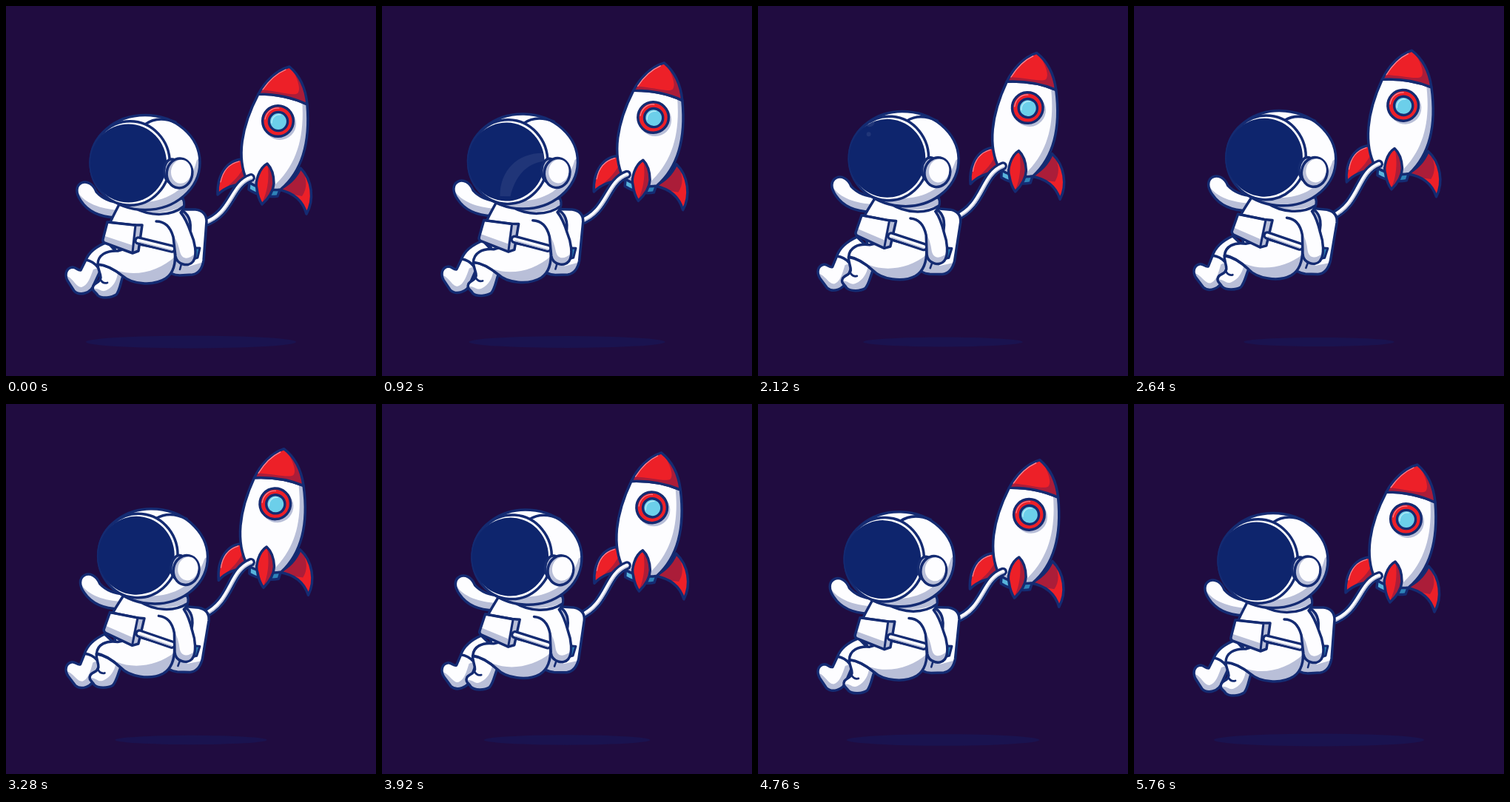
Recreate the animation shown at these times as an HTML page with a canvas. Size 500x500 px, loop 5.8 s.

```html
<!DOCTYPE html>
<html lang="en">
<head>
<meta charset="utf-8">
<title>Astronaut and rocket</title>
<style>
html, body { margin: 0; width: 100%; height: 100%; overflow: hidden; background: #200c40; }
canvas { display: block; width: 100vw; height: 100vh; }
</style>
</head>
<body>
<canvas id="stage" width="500" height="500"></canvas>
<script>
const ctx = document.getElementById('stage').getContext('2d');
const LOOP = 5800;
const BG = '#200c40', LINE = '#142b72', VISOR = '#0e256d', WHITE = '#fdfdff', GREY = '#b9bfd8';
const RED = '#ed2028', DARK_RED = '#ab1d39', PINK = '#f58c98', CYAN = '#6ccfea', BLUE = '#2f83b8';
const PIVOT = [256, 326];

// Filled shape with an optional clipped shade and an outline
function part(d, fill, shade, shadeFill, width = 3.5) {
  const p = new Path2D(d);
  ctx.fillStyle = fill;
  ctx.fill(p);
  if (shade) {
    ctx.save();
    ctx.clip(p);
    ctx.fillStyle = shadeFill || GREY;
    ctx.fill(new Path2D(shade));
    ctx.restore();
  }
  if (width) line(d, LINE, width);
}

function line(d, color = LINE, width = 3.5) {
  ctx.strokeStyle = color;
  ctx.lineWidth = width;
  ctx.stroke(new Path2D(d));
}

function oval(x, y, rx, ry, fill, width = 0, tilt = 0) {
  ctx.beginPath();
  ctx.ellipse(x, y, rx, ry, tilt, 0, 2 * Math.PI);
  ctx.fillStyle = fill;
  ctx.fill();
  if (width) {
    ctx.strokeStyle = LINE;
    ctx.lineWidth = width;
    ctx.stroke();
  }
}

function turn(angle, x, y, shift, draw) {
  ctx.save();
  ctx.translate(x, y + shift);
  ctx.rotate(angle);
  ctx.translate(-x, -y);
  draw();
  ctx.restore();
}

function rocket() {
  part('M329 238L328 248C340 256 355 259 367 257L371 246Z', BLUE,
    'M326 238L338 240L337 258L324 254Z', '#58b4dc');
  part('M321 207C301 207 285 225 286 255C296 245 308 241 328 239Z', RED,
    'M322 216C316 229 308 237 294 248L330 244Z', DARK_RED);
  line('M290 238C293 223 302 213 315 210', PINK, 1.2);
  part('M398 219C414 235 417 262 406 281C401 262 388 252 368 248C382 242 392 232 398 219Z', RED,
    'M398 218C407 232 408 245 400 257L364 250Z', DARK_RED);
  part('M341 119C318 163 311 205 326 237C340 246 356 250 371 248C402 222 411 180 407 133C388 124 365 119 341 119Z', WHITE,
    'M400 126C404 175 394 215 361 244L325 233L322 255L420 260L420 125Z');
  part('M383 82C365 87 350 102 341 119C365 119 388 124 407 133C405 111 396 93 383 82Z', RED,
    'M385 82C394 98 399 112 394 118C388 122 368 115 345 113L338 124L412 140L412 96Z', DARK_RED);
  line('M347 113C356 100 366 91 378 86', PINK, 1.3);
  oval(370, 159, 22, 22, GREY);
  oval(367.5, 155.5, 20.8, 20.8, RED, 3.5);
  line('M350 153C352 143 360 137 369 138', PINK, 1.2);
  oval(368, 156, 12.6, 12.6, CYAN, 3.4);
  line('M359 158C359 151 364 146 371 147', '#b3ebf7', 1.5);
}

function middleFin() {
  part('M353 213C342 219 336 238 339 247C340 256 342 262 346 268C356 259 361 251 362 240C362 228 359 219 353 213Z',
    RED, 'M353 211C356 228 355 249 345 268L366 268L366 215Z', DARK_RED);
}

function tether(k, angle) {
  const dx = 268 - PIVOT[0], dy = 293 - PIVOT[1];
  const c = Math.cos(angle), s = Math.sin(angle);
  const x = PIVOT[0] + dx * c - dy * s - 4 * k, y = PIVOT[1] + dx * s + dy * c - 10 * k;
  const d = `M331 ${232 - 19 * k}C${304 - 3 * k} ${241 - 16 * k} ${305 + k} ${281 - 15 * k} ${x} ${y}`;
  line(d, LINE, 11.8);
  line(d, WHITE, 5.2);
  ctx.save();
  ctx.translate(1, 1.7);
  line(d, GREY, 1.6);
  ctx.restore();
}

function backpack() {
  part('M236 275L256 275Q271 277 271 291L267 344Q264 361 252 363L235 364Q222 364 217 355Z', WHITE,
    'M232 272L240 278C249 286 250 300 247 318L247 352L267 346L268 368L210 368L225 275Z');
  line('M239 277C250 284 251 299 247 315');
  line('M235 356L238 345', LINE, 2.6);
}

function leftArm() {
  part('M156 266C140 265 130 260 122 251C118 240 109 236 102 239C94 243 94 253 101 263C110 277 126 285 148 286Z',
    WHITE, 'M96 250C106 267 128 274 152 276L150 292L110 290L90 262Z');
}

function leftLeg() {
  part('M137 319C121 325 112 333 108 343L101 357C97 358 95 353 90 353C81 354 79 363 83 371L92 385C99 392 115 389 119 376L130 352C132 340 137 335 148 331Z',
    WHITE, 'M80 364C91 367 94 380 102 380C110 378 114 367 118 356L130 352L124 393L86 393Z');
  line('M108 343Q118 345 124 353');
}

function rightLeg() {
  part('M124 349C124 356 128 361 128 367C127 374 121 373 118 378C115 385 121 386 124 391C130 396 143 394 149 390C154 384 155 373 158 365C148 357 137 350 124 349Z',
    WHITE, 'M116 382C127 380 128 388 136 384C146 379 150 369 151 361L162 364L156 398L118 398Z');
  line('M127 369Q131 376 137 374', LINE, 2.8);
}

function torso() {
  part('M153 268C147 280 141 290 139 298L148 332L229 340C237 315 240 295 237 278C241 273 242 266 239 260Z', WHITE,
    'M150 268C182 284 222 282 242 268L240 255L148 255Z');
  line('M174 273C196 285 223 284 240 271');
  part('M151 331C135 330 124 337 124 349C137 350 148 357 158 365C170 376 199 379 216 368C226 361 230 349 228 331L180 322Z',
    WHITE, 'M152 358C177 366 208 358 229 338L240 350L222 382L160 380Z');
}

function beltAndArm() {
  part('M137 292L173 296L184 296L179 331L171 334L133 320Q130 318 131 315Z', WHITE,
    'M128 309L170 323L173 299L190 294L182 338L126 326Z');
  line('M137 292L175 296L171 333', LINE, 3);
  const belt = 'M179 317L224 328';
  line(belt, LINE, 11.5);
  line(belt, WHITE, 4.8);
  line('M180 319L224 330', GREY, 1.6);
  part('M254 327L262 327L259 340L253 342Z', BLUE, null, null, 3);
  // The shoulder stays open towards the chest
  const arm = 'M203 291C215 291 222 298 226 312L229 338C231 350 247 353 253 345C259 336 255 318 250 307C246 295 242 286 236 279';
  part(arm + 'L215 284Z', WHITE,
    'M203 290C221 298 232 315 235 332C238 344 248 343 258 332L255 354L226 354L222 320Z', GREY, 0);
  line(arm);
}

function glint(t) {
  const p = (t - 920) / 1200;
  if (p < -0.6 || p > 1.5) return;
  ctx.save();
  ctx.beginPath();
  ctx.ellipse(165.5, 212.5, 51, 53, 0, 0, 2 * Math.PI);
  ctx.clip();
  ctx.translate(-79 * p, -85 * p);
  const shine = 'rgba(255,255,255,.075)';
  ctx.fillStyle = shine;
  ctx.fill(new Path2D('M158 259C157 222 184 196 224 200L222 210C194 211 178 231 172 259Z'));
  oval(217, 250, 7, 7, shine);
  oval(217, 267, 3, 3, shine);
  ctx.restore();
}

function head(t) {
  const shell = [188, 211.5, 74, 64];
  oval(...shell, WHITE);
  ctx.save();
  ctx.clip();
  ctx.fillStyle = GREY;
  ctx.fill(new Path2D('M140 256C175 274 243 270 258 208L270 200L270 285L140 285Z'));
  ctx.restore();
  oval(...shell, 'transparent', 3.5);
  line('M188 160C199 152 213 151 229 157');
  oval(167.8, 212.5, 53.6, 56.8, WHITE, 3.5);
  oval(165.5, 212.5, 51.6, 53, VISOR);
  glint(t);
  oval(224, 223, 10.5, 16, GREY, 3.5);
  oval(234.5, 226, 17.3, 20, GREY, 3.5, 0.12);
  oval(236.6, 223.8, 13.6, 16, WHITE, 0, 0.12);
}

function astronaut(t, k, angle) {
  turn(angle, ...PIVOT, 0, () => {
    backpack();
    turn(-0.12 * k, 153, 273, 0, leftArm);
    turn(-0.18 * k, 125, 345, 5 * k, leftLeg);
    turn(-0.02 * k, 158, 362, 0, rightLeg);
    torso();
    beltAndArm();
    head(t);
  });
}

function draw(t) {
  const k = (1 - Math.cos(2 * Math.PI * t / LOOP)) / 2;
  const angle = 0.094 * k;
  ctx.fillStyle = BG;
  ctx.fillRect(0, 0, 500, 500);
  const size = 1 - 0.29 * k;
  oval(250, 454, 142 * size, 8.5 * size, '#1a134f');
  const fly = fn => turn(-0.052 * k, 355, 230, -21 * k, fn);
  fly(rocket);
  tether(k, angle);
  fly(middleFin);
  astronaut(t, k, angle);
}

ctx.lineJoin = ctx.lineCap = 'round';
let start;
function tick(now) {
  if (start === undefined) start = now;
  draw((now - start) % LOOP);
  requestAnimationFrame(tick);
}
draw(0);
requestAnimationFrame(tick);
</script>
</body>
</html>
```
